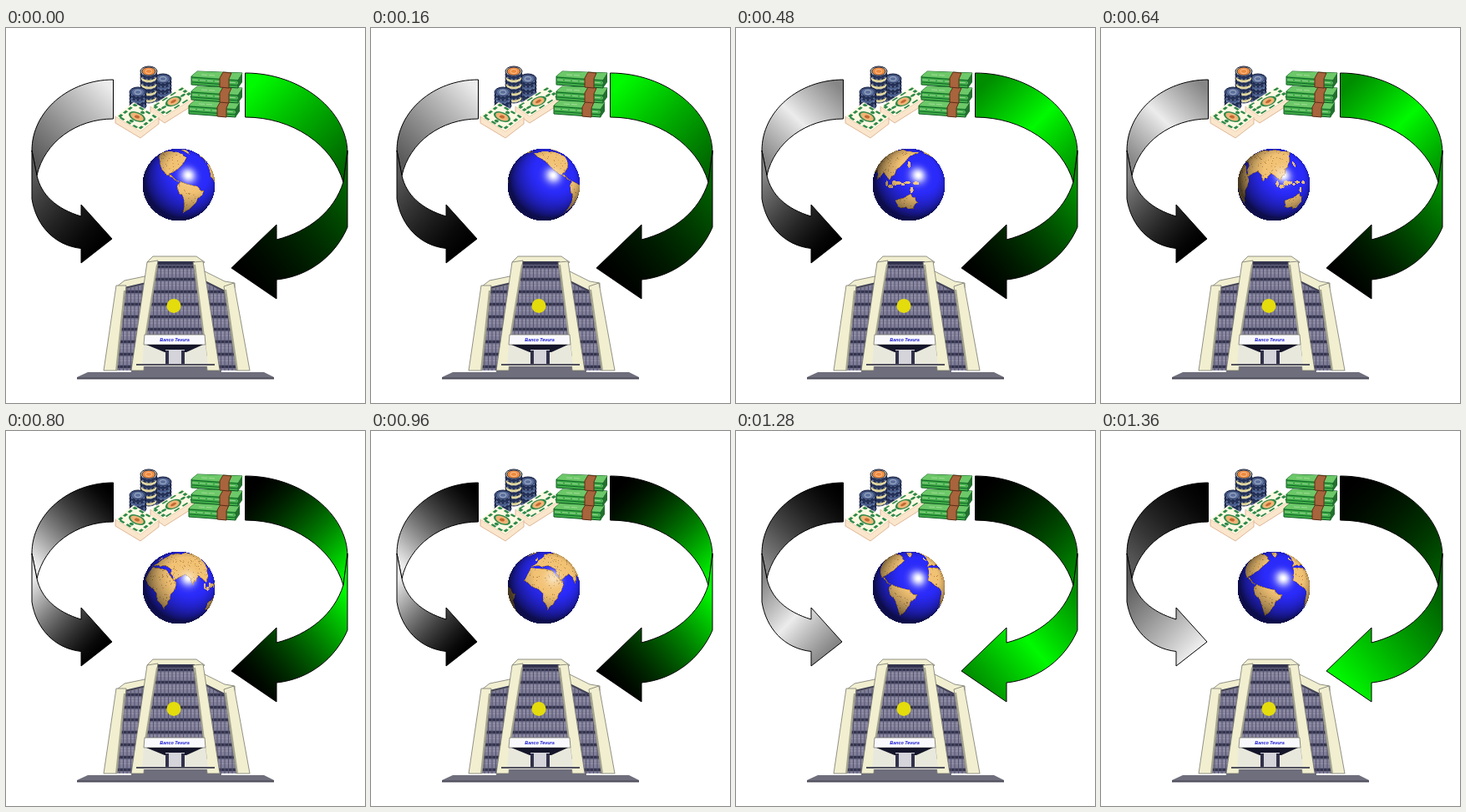
An HTML page with a canvas for the animation above (1440 ms loop, 430 by 450 pixels).

```html
<!DOCTYPE html>
<html lang="en">
<head>
<meta charset="utf-8">
<title>Money cycle</title>
<style>
html, body { margin: 0; width: 100%; height: 100%; overflow: hidden; background: #fff; }
svg, canvas { position: absolute; left: 0; top: 0; display: block; }
canvas { left: 163px; top: 144px; image-rendering: pixelated; }
.arrow { stroke: #000; stroke-linejoin: round; }
.cream { fill: #f1efd0; stroke: #77766c; stroke-width: .8; }
.sign { font: italic bold 5.4px "Liberation Sans", Arial, sans-serif; fill: #1414d2; }
</style>
</head>
<body>
<svg width="430" height="450" viewBox="0 0 430 450">
  <defs>
    <linearGradient id="greyTop" gradientUnits="userSpaceOnUse" x1="128" y1="75" x2="42" y2="165"/>
    <linearGradient id="greyEnd" gradientUnits="userSpaceOnUse" x1="35" y1="175" x2="120" y2="255"/>
    <linearGradient id="greenTop" gradientUnits="userSpaceOnUse" x1="290" y1="75" x2="398" y2="185"/>
    <linearGradient id="greenEnd" gradientUnits="userSpaceOnUse" x1="404" y1="190" x2="280" y2="295"/>
    <pattern id="glass" width="9" height="15" patternUnits="userSpaceOnUse" y="4">
      <rect width="9" height="15" fill="#807e98"/>
      <path d="M0 2H9M0 5H9" stroke="#9a98ae"/>
      <path d="M0 12.5H9" stroke="#34344e" stroke-width="3.500"/>
      <path d="M1 0V15M5.5 0V15" stroke="#55536e"/>
    </pattern>
  </defs>

  <g class="arrow">
    <path fill="url(#greyTop)" d="M128.5 62C75 62 31 100 31 147L37 177C46 137 84 109 128.5 109Z"/>
    <path fill="url(#greyEnd)" d="M31 147V205C36 237 58 261 90 264.5V282L127 253L90 212V226C60 217 42 200 37 177Z"/>
    <path fill="url(#greenTop)" d="M286.5 54C354 54 409 100 409 150L404 185C391 140 343 107 286.5 107Z"/>
    <path fill="url(#greenEnd)" d="M409 147V239C395 272 364 298 324 302V325L270 288L324 236V254C363 244 393 220 404 185Z"/>
  </g>

  <g id="money"></g>

  <g id="building">
    <path d="M85 421V419L98 413H150V405H258V413H309L321 419V421Z" fill="#6e6e7c"/>
    <path d="M85 420.5H321" stroke="#4c4c5a" stroke-width="2"/>
    <!-- wings -->
    <path d="M138 308L170 301L160 411H124Z" fill="url(#glass)"/>
    <path d="M236 301L266 306L283 411H248Z" fill="url(#glass)"/>
    <path class="cream" d="M133 310L142 303L171 297V306L142 313Z"/>
    <path class="cream" d="M236 291L262 304L274 306V312L262 316L236 304Z"/>
    <path d="M142 312L168 306M238 304L262 316" stroke="#44445a" stroke-width="2"/>
    <path class="cream" d="M132 309H144L133 411H117Z"/>
    <path class="cream" d="M261 310L273 306L292 411H276Z"/>
    <path d="M142 315L132 411M263 314L277 411" stroke="#a5a48f" stroke-width="2"/>
    <!-- tower -->
    <path d="M179 281H226L237 370H167Z" fill="url(#glass)"/>
    <path class="cream" d="M169 281L176 274H228L238 281L232 285L225 283H181L174 284Z"/>
    <path d="M180 282H226" stroke="#33334e" stroke-width="4"/>
    <path class="cream" d="M169 281L182 279L168 370L165 411H150Z"/>
    <path class="cream" d="M224 281L236 280L256 411H241L237 370Z"/>
    <path d="M181 284L167 371M226 284L240 394" stroke="#a5a48f" stroke-width="2"/>
    <!-- entrance -->
    <path d="M165 380H239L242 406H163Z" fill="#e9e8dd"/>
    <path class="cream" d="M166 368H238L239 380H165Z" style="fill:#f9f9fd"/>
    <path d="M168 380H236L216 389H190Z" fill="#15152a"/>
    <path d="M191 386H214V404H191Z" fill="#d4d4da"/>
    <path d="M193 387V404M212 387V404" stroke="#30304a" stroke-width="4"/>
    <path d="M156 404H250" stroke="#50505e" stroke-width="2"/>
    <text class="sign" x="202" y="376" text-anchor="middle">Banco Tevura</text>
    <circle cx="201" cy="333.500" r="8.500" fill="#e4dc0c"/>
  </g>
</svg>
<canvas width="88" height="88"></canvas>

<script>
const LOOP = 1440;
const rad = Math.PI / 180;

let seed = 7;
const random = () => (seed = seed * 16807 % 2147483647) / 2147483647;
const spread = size => (random() - .5) * size;

// Money
const poly = (pts, fill, stroke = 'none') =>
  `<polygon points="${pts}" fill="${fill}" stroke="${stroke}"/>`;

function coins(x, y, count, top, light) {
  let out = '';
  for (let i = count; i >= 0; i--) {
    const cy = y + i * 4;
    out += `<ellipse cx="${x}" cy="${cy}" rx="10" ry="6" fill="${i % 2 ? '#26345c' : light}" stroke="#141c3c"/>
      <path d="M${x - 8} ${cy + 3}q8 5 16 0" fill="none" stroke="#98a8c8" stroke-dasharray="2 3"/>`;
  }
  return out + `<ellipse cx="${x}" cy="${y}" rx="8" ry="5" fill="${top}" stroke="#26345c"/>
    <ellipse cx="${x}" cy="${y}" rx="4" ry="2.500" fill="none" stroke="#fff" stroke-opacity=".45"/>`;
}

// A bundle is a unit square carried by two edge vectors.
function notes(x, y, ax, ay, bx, by) {
  const at = (u, v, drop = 0) => `${x + u * ax + v * bx},${y + u * ay + v * by + drop}`;
  const side = [at(0, 0), at(0, 1), at(1, 1), at(1, 1, 8), at(0, 1, 8), at(0, 0, 8)].join(' ');
  return poly(side, '#fae6cc', '#e0b898') + `<g transform="matrix(${ax} ${ay} ${bx} ${by} ${x} ${y})">
    <rect width="1" height="1" fill="#fdf8e2"/>
    <rect x=".07" y=".1" width=".86" height=".8" fill="none" stroke="#2e8a4a" stroke-width=".09" stroke-dasharray=".16 .1"/>
    <ellipse cx=".5" cy=".5" rx=".19" ry=".26" fill="#f1b478" stroke="#2e8a4a" stroke-width=".06"/>
    <circle cx=".2" cy=".5" r=".07" fill="#2e8a4a"/><circle cx=".8" cy=".5" r=".07" fill="#2e8a4a"/>
    <circle cx=".5" cy=".5" r=".08" fill="#c26a32"/></g>`;
}

const brick = (x, y) => `<g transform="translate(${x} ${y})">
  <path d="M0 6L7 0L61 2L56 10V20L0 16Z" fill="#42ae4a" stroke="#0c5a20"/>
  <path d="M0 6L7 0L61 2L56 10Z" fill="#6cc868"/>
  <path d="M56 10L61 2V13L56 20Z" fill="#23702f"/>
  <path d="M0 7L56 11M1 13L56 17" stroke="#0e6426"/>
  <path d="M1 10L56 14M12 4L28 5" stroke="#a4dc9c" stroke-dasharray="7 2"/>
  <path d="M34 8L38 1L48 2L45 9V20L34 19Z" fill="#a8643c" stroke="#5e2c18"/></g>`;

document.getElementById('money').innerHTML =
  coins(188, 61, 6, '#5c709c', '#4a5f8e') + coins(171, 52, 8, '#ee8a3c', '#e2d8a0') +
  coins(158, 77, 4, '#5c709c', '#4a5f8e') +
  notes(173, 94, 38, -24, 17, 12) + notes(131, 106, 22, -17, 30, 18) +
  brick(219, 87) + brick(222, 70) + brick(222, 52);

// Arrows: a bright spot runs along each arrow, from tail (0) to tip (1).
const shades = {
  grey: v => `rgb(${v * 236},${v * 236},${v * 236})`,
  green: v => `rgb(0,${v * 250},0)`
};

function paintArrows(peak) {
  const reach = Math.max(peak, 1 - peak);
  const stops = (shade, from) => Array.from({ length: 11 }, (_, i) => {
    const v = (1 - Math.abs(from + i / 20 - peak) / reach) ** 1.4;
    return `<stop offset="${i / 10}" stop-color="${shade(v)}"/>`;
  }).join('');
  for (const name in shades) {
    document.getElementById(name + 'Top').innerHTML = stops(shades[name], 0);
    document.getElementById(name + 'End').innerHTML = stops(shades[name], .5);
  }
}

// Globe: key points of each continent as longitude and latitude.
const continents = [
  '-165 63 -125 70 -82 66 -60 52 -80 30 -97 20 -80 8 -107 24 -124 42',
  '-78 8 -50 0 -36 -8 -48 -27 -70 -50 -72 -18 -81 -5',
  '-8 36 32 31 50 11 40 -15 25 -34 10 0 -16 14',
  '-9 38 10 56 25 70 105 76 180 67 140 55 121 32 105 10 90 22 78 8 66 25 45 14 36 36 20 40',
  '114 -23 140 -12 153 -27 145 -38 116 -34',
  '-65 77 -25 80 -45 60'
].map(text => text.split(' ').map(Number));

function makeMap() {
  const map = document.createElement('canvas');
  map.width = 720;
  map.height = 360;
  const g = map.getContext('2d');
  g.setTransform(2, 0, 0, -2, 360, 180);
  g.fillStyle = '#f2c274';
  g.strokeStyle = '#a87838';
  const blob = (lon, lat, w, h) => { g.beginPath(); g.ellipse(lon, lat, w, h, 0, 0, 7); g.fill(); };
  for (const p of continents) {
    g.beginPath();
    for (let i = 0; i < p.length; i += 2) {
      const nextLon = p[(i + 2) % p.length], nextLat = p[(i + 3) % p.length];
      for (let u = 0; u < 1; u += .25) {
        const rough = u ? 5 : 0;
        g.lineTo(p[i] + (nextLon - p[i]) * u + spread(rough), p[i + 1] + (nextLat - p[i + 1]) * u + spread(rough));
      }
    }
    g.closePath();
    g.fill();
    g.stroke();
  }
  // the archipelago between Asia and Australia
  for (let lon = 100; lon < 150; lon += 7) blob(lon, spread(14), 2 + random() * 3, 2 + random() * 3);
  blob(-2, 54, 3, 4);
  blob(138, 37, 3, 6);
  // dark specks on land
  g.globalCompositeOperation = 'source-atop';
  g.fillStyle = '#b48444';
  for (let i = 0; i < 900; i++) g.fillRect(spread(360), spread(150), 1.5, 1.5);
  return g.getImageData(0, 0, 720, 360).data;
}

const map = makeMap();
const pen = document.querySelector('canvas').getContext('2d');
const tilt = 3 * rad;

function globe(lon0) {
  const img = pen.createImageData(88, 88);
  for (let py = 0; py < 88; py++) for (let px = 0; px < 88; px++) {
    const x = (px - 43.5) / 43.5, y = (43.5 - py) / 43.5, rr = x * x + y * y;
    if (rr > 1) continue;
    const z = Math.sqrt(1 - rr);
    const lat = Math.asin(y * Math.cos(tilt) + z * Math.sin(tilt)) / rad;
    const lon = lon0 + Math.atan2(x, z * Math.cos(tilt) - y * Math.sin(tilt)) / rad;
    const mx = Math.floor(((lon + 900) % 360) * 2), my = Math.min(359, Math.floor((90 - lat) * 2));
    const m = (my * 720 + mx) * 4, dry = map[m + 3] > 120;
    const lit = Math.min(1, .3 + .85 * Math.max(0, .33 * x + .38 * y + .864 * z));
    const shine = Math.max(0, .26 * x + .26 * y + .93 * z) ** 42 * (dry ? .5 : 1);
    const base = dry ? [map[m], map[m + 1], map[m + 2]] : [42, 42, 250];
    const o = (py * 88 + px) * 4;
    base.forEach((c, i) => { img.data[o + i] = c * lit + (255 - c * lit) * shine; });
    img.data[o + 3] = 255;
  }
  return img;
}

// Nine turns westwards, a little faster in the first half.
const globes = Array.from({ length: 9 }, (_, i) => globe(-80 - 40 * i - 26 * Math.sin(Math.PI * i / 9)));
let shownBand, shownTurn;

function draw(now) {
  const t = now % LOOP;
  const band = Math.max(0, Math.floor((t - 80) / 320));
  const turn = Math.floor(t / 160);
  if (band !== shownBand) paintArrows((shownBand = band) / 4);
  if (turn !== shownTurn) pen.putImageData(globes[shownTurn = turn], 0, 0);
}

const start = performance.now();
function tick() {
  draw(performance.now() - start);
  requestAnimationFrame(tick);
}
tick();
</script>
</body>
</html>
```
